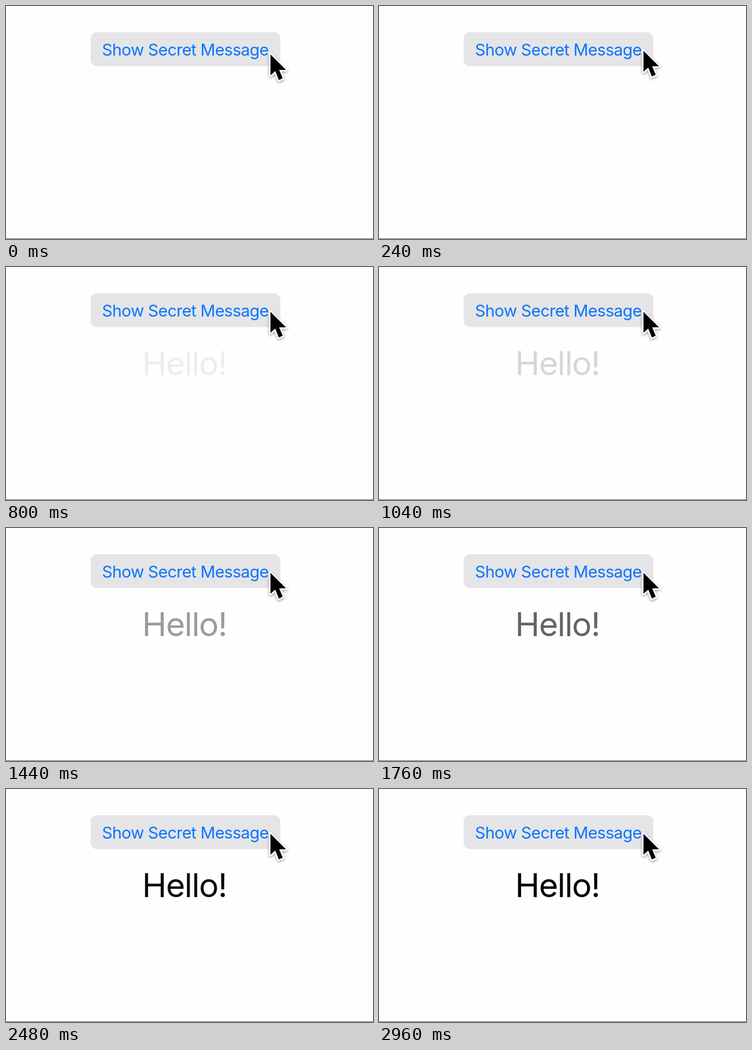
Recreate the animation shown at these times as an HTML page. Size 612x390 px, loop 3120 ms.

```html
<!DOCTYPE html>
<html lang="en">
<head>
<meta charset="utf-8">
<style>
  html, body { margin: 0; height: 100%; overflow: hidden; background: #fefefe; }
  svg { display: block; }
  text { font-family: Inter, sans-serif; letter-spacing: -0.022em; }
  #cursor { filter: drop-shadow(0 2px 2px rgba(0, 0, 0, .35)); }
</style>
</head>
<body>
<svg width="612" height="390" viewBox="0 0 612 390">
  <rect width="612" height="390" fill="#fefefe"/>
  <rect y="389" width="612" height="1" fill="#707070"/>
  <g id="button">
    <rect x="141" y="44" width="316.5" height="56.5" rx="10" fill="#e5e5e7"/>
    <text x="160" y="82.5" font-size="27.4" fill="#0873ff">Show Secret Message</text>
  </g>
  <text id="message" x="227" y="180.5" font-size="55">Hello!</text>
  <path id="cursor" d="M441 75V110L449 103L455 118L461.5 115L455.5 101H467Z"
        stroke="#fff" stroke-width="5" stroke-linejoin="round" paint-order="stroke"/>
</svg>
<script>
const LOOP = 3120, STEP = 80;
const [button, message, cursor] = ['button', 'message', 'cursor'].map(id => document.getElementById(id));
const progress = (t, start, length) => Math.min(1, Math.max(0, (t - start) / length));

// cubic-bezier(.42, 0, .58, 1)
function easeInOut(x) {
  let low = 0, high = 1;
  for (let i = 0; i < 24; i++) {
    const s = (low + high) / 2;
    const bx = 1.26 * s * (1 - s) ** 2 + 1.74 * s * s * (1 - s) + s ** 3;
    if (bx < x) low = s; else high = s;
  }
  return low * low * (3 - 2 * low);
}

function draw(now) {
  const t = Math.floor(now % LOOP / STEP) * STEP;
  const rise = 6 * (1 - progress(t, 0, 240)) ** 2;
  cursor.setAttribute('transform', `translate(0 ${rise})`);
  button.setAttribute('opacity', t < 400 ? 1 : 0.78 + 0.22 * progress(t, 400, 320));
  message.setAttribute('opacity', easeInOut(progress(t, 360, 2500)));
  requestAnimationFrame(draw);
}
draw(performance.now());
</script>
</body>
</html>
```
